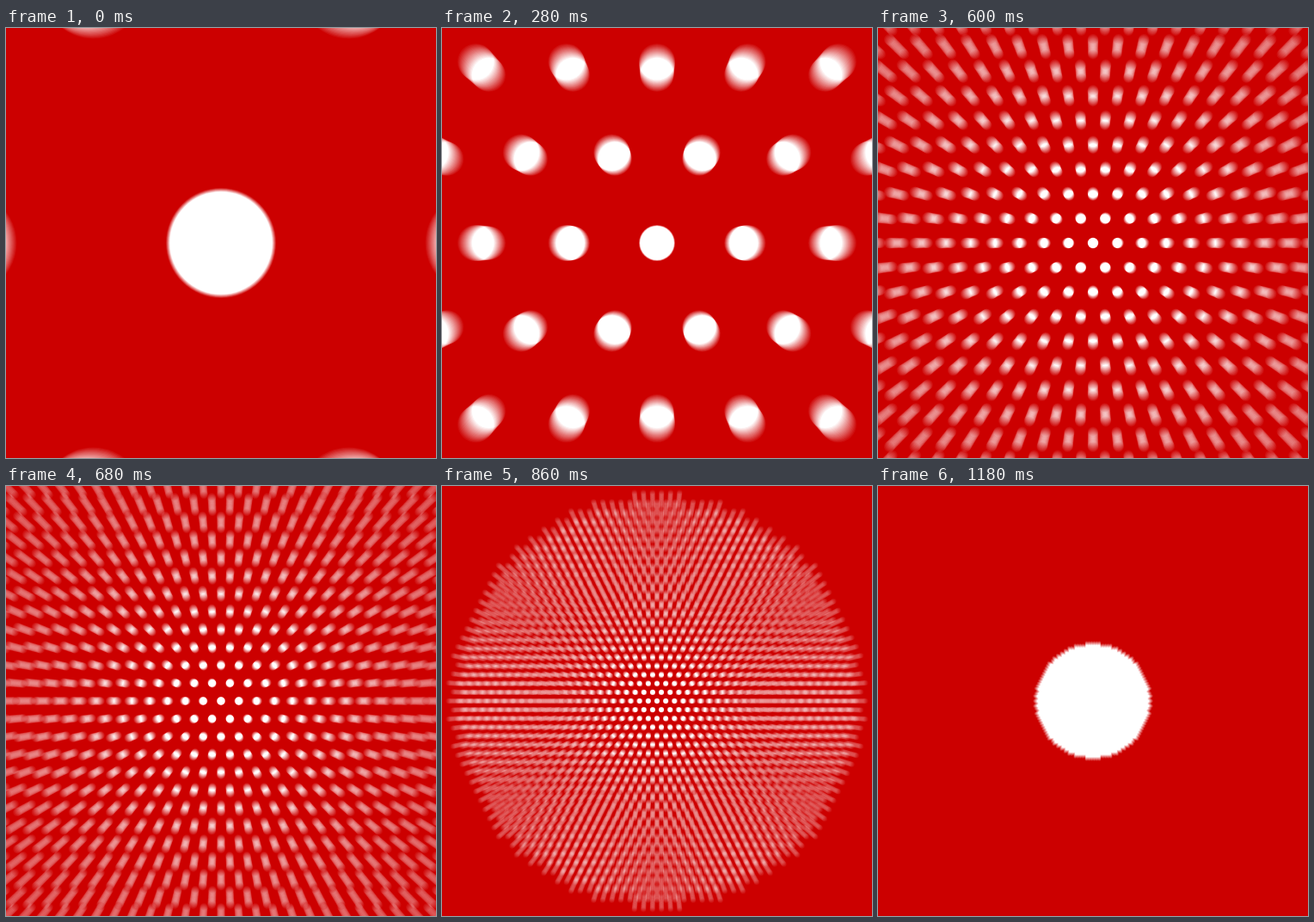
An HTML page with a canvas that plays this animation: 500x500 px, repeating every 1.2 s.

```html
<!DOCTYPE html>
<html lang="en">
<head>
<meta charset="utf-8">
<title>Dots</title>
<style>
  html, body { margin: 0; width: 100%; height: 100%; overflow: hidden; background: #c00; }
  canvas { display: block; }
</style>
</head>
<body>
<canvas id="stage" width="500" height="500"></canvas>
<script>
const ctx = document.getElementById('stage').getContext('2d');
const LOOP = 1200, STEP = 20;
const SPACING = 308.5, RATE = 0.00397; // lattice spacing at t = 0, shrink per ms
const LIMIT = 23.2;                    // radius of the dot field, in cells
const SAMPLES = 17;                    // 17 * (3, 15, 15) lifts #c00 to pure white

function fillLattice(time) {
  const cell = SPACING * Math.exp(-RATE * time);
  const radius = cell * (0.2 + 0.5 * (time / LOOP) ** 5);
  const reach = Math.min(LIMIT, (250 + radius) / cell);
  const rows = Math.floor(reach);
  ctx.beginPath();
  for (let row = -rows; row <= rows; row++) {
    const shift = (row & 1) / 2;
    for (let col = -rows - 1; col <= rows + 1; col++) {
      const x = col + shift;
      if (Math.abs(x) > reach || Math.hypot(x, row) > LIMIT) continue;
      const px = 250 + x * cell, py = 250 + row * cell;
      ctx.moveTo(px + radius, py);
      ctx.arc(px, py, radius, 0, 2 * Math.PI);
    }
  }
  ctx.fill();
}

function draw(time) {
  ctx.globalCompositeOperation = 'source-over';
  ctx.fillStyle = '#c00';
  ctx.fillRect(0, 0, 500, 500);
  // Motion blur: add up evenly spaced moments of one step.
  ctx.globalCompositeOperation = 'lighter';
  ctx.fillStyle = 'rgb(3, 15, 15)';
  for (let k = 0; k < SAMPLES; k++) {
    fillLattice(time + ((k + 0.5) / SAMPLES - 0.5) * STEP);
  }
}

let shown = -1;
function tick(now) {
  const time = Math.floor((now % LOOP) / STEP) * STEP;
  if (time !== shown) draw(shown = time);
  requestAnimationFrame(tick);
}
requestAnimationFrame(tick);
</script>
</body>
</html>
```
